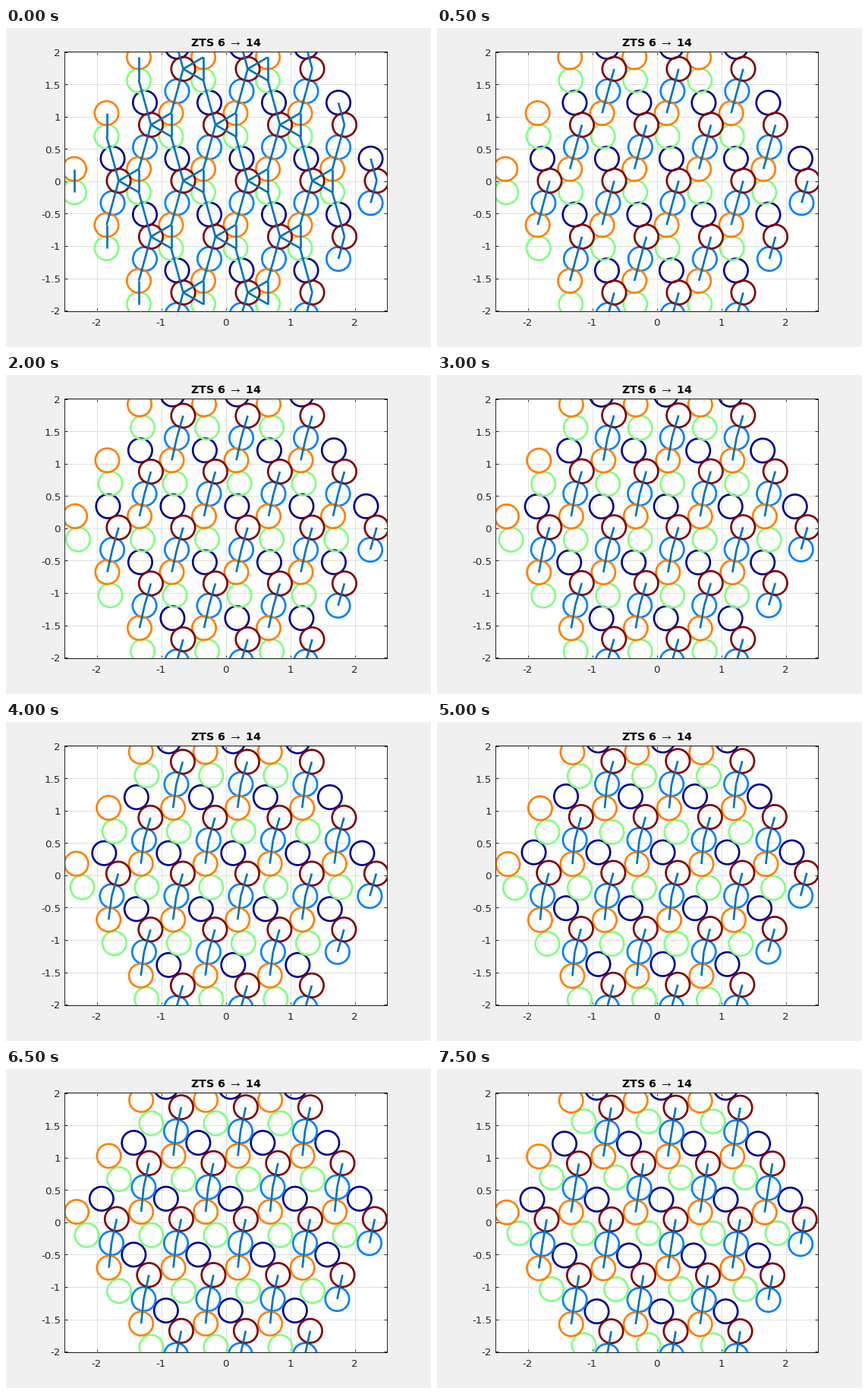
Recreate the animation shown at these times as a matplotlib script. Size 560 by 420 pixels, loop 8 s.

```python
import numpy as np
import matplotlib.pyplot as plt
from matplotlib.animation import FuncAnimation
from matplotlib.collections import LineCollection

W, H, DPI = 560, 420, 100
PX = 72 / DPI            # points per pixel
UNIT = 85                # pixels per axis unit
FRAMES, INTERVAL = 16, 500
LEFT, RIGHT, TOP, BOTTOM = 77, 502, 31, 373
CX, CY = (LEFT + RIGHT) / 2, (TOP + BOTTOM) / 2
DISC = 31.4              # disc diameter
INK = "#262626"

plt.rcParams["font.family"] = "DejaVu Sans"
plt.rcParams["mathtext.fontset"] = "stix"

NAVY, BLUE, GREEN, ORANGE, RED = range(5)
COLORS = ["#00008f", "#0080ff", "#80ff80", "#ff8000", "#800000"]

# Hexagonal patch of 19 cells, in lattice coordinates
A1 = np.array([1, 0])
A2 = np.array([0.5, np.sqrt(3) / 2])
CELLS = [(i, j) for j in range(-2, 3) for i in range(-2, 3) if abs(i + j) <= 2]
ORIGINS = np.array([i * A1 + j * A2 for i, j in CELLS])

# Bonds: disc, other disc, lattice step to the other disc's cell
CHAIN = [(RED, BLUE, (0, 0)), (BLUE, ORANGE, (1, -1))]
LOCKED = CHAIN + [
    (NAVY, RED, (0, 0)),
    (RED, ORANGE, (1, 0)),
    (RED, GREEN, (1, 0)),
    (ORANGE, GREEN, (0, 0)),
    (NAVY, GREEN, (0, 1)),
]


def basis(u):
    """Disc centres within a cell at progress u in 0..1."""
    swing = np.sin(np.pi * u ** 2)
    late = np.sin(np.pi * u ** 3)
    wave = np.sin(2 * np.pi * u ** 1.5)
    return np.array([
        (21 - 15 * np.sin(np.pi * u / 2), 30.1 - 1.2 * wave),
        (21 - 1.4 * u - 0.5 * swing, -28.4 + 1.6 * swing),
        (-29.5 + 18.5 * u + 0.6 * swing, -14.3 - 2.7 * late),
        (-29.5 + 1.7 * u + 2.3 * swing, 16.3 - 3.1 * u ** 2),
        (29 - 4 * u ** 3, 0.9 + 3.1 * u ** 2 + 1.4 * late),
    ]) / UNIT


def bond_lines(pos, bonds):
    lines = []
    for (i, j), origin in zip(CELLS, ORIGINS):
        for a, b, (di, dj) in bonds:
            if (i + di, j + dj) in CELLS:
                end = origin + di * A1 + dj * A2
                lines.append([origin + pos[a], end + pos[b]])
    return lines


fig = plt.figure(figsize=(W / DPI, H / DPI), dpi=DPI, facecolor="#f0f0f0")
ax = fig.add_axes([LEFT / W, 1 - BOTTOM / H,
                   (RIGHT - LEFT) / W, (BOTTOM - TOP) / H])
half_x = (RIGHT - LEFT) / 2 / UNIT
half_y = (BOTTOM - TOP) / 2 / UNIT
ax.set_xlim(-half_x, half_x)
ax.set_ylim(-half_y, half_y)
ax.set_xticks(range(-2, 3))
ax.set_yticks(np.arange(-2, 2.1, 0.5))
ax.set_xticklabels([])
ax.set_yticklabels([])
ax.set_axisbelow(True)
ax.grid(color="#dfdfdf", lw=PX)
ax.tick_params(direction="in", top=True, right=True,
               length=4 * PX, width=PX, color=INK)
for spine in ax.spines.values():
    spine.set(color=INK, linewidth=PX)


def label(x, y, text, size, **kw):
    fig.text(x / W, 1 - y / H, text, fontsize=size * PX, va="baseline", **kw)


for v in range(-2, 3):
    label(CX + v * UNIT, 392, f"{v}", 13.33, ha="center", color=INK)
for v in np.arange(-2, 2.1, 0.5):
    label(72, CY + 5.3 - v * UNIT, f"{v:g}", 13.33, ha="right", color=INK)
label(CX, 24, r"ZTS 6 $\rightarrow$ 14", 14.2, ha="center",
      color="black", weight="bold")

discs = [ax.scatter(*ORIGINS.T, s=(DISC * PX) ** 2, facecolors="none",
                    edgecolors=c, linewidths=2.67 * PX, zorder=2 + 0.01 * n)
         for n, c in enumerate(COLORS)]
bonds = LineCollection([], colors="#0072bd", linewidths=2.67 * PX, zorder=2.2)
ax.add_collection(bonds, autolim=False)


def draw(step):
    pos = basis(step / (FRAMES - 1))
    for disc, p in zip(discs, pos):
        disc.set_offsets(ORIGINS + p)
    bonds.set_segments(bond_lines(pos, LOCKED if step == 0 else CHAIN))
    return [*discs, bonds]


anim = FuncAnimation(fig, draw, frames=FRAMES, interval=INTERVAL,
                     repeat=True, repeat_delay=0)
plt.show()
```
